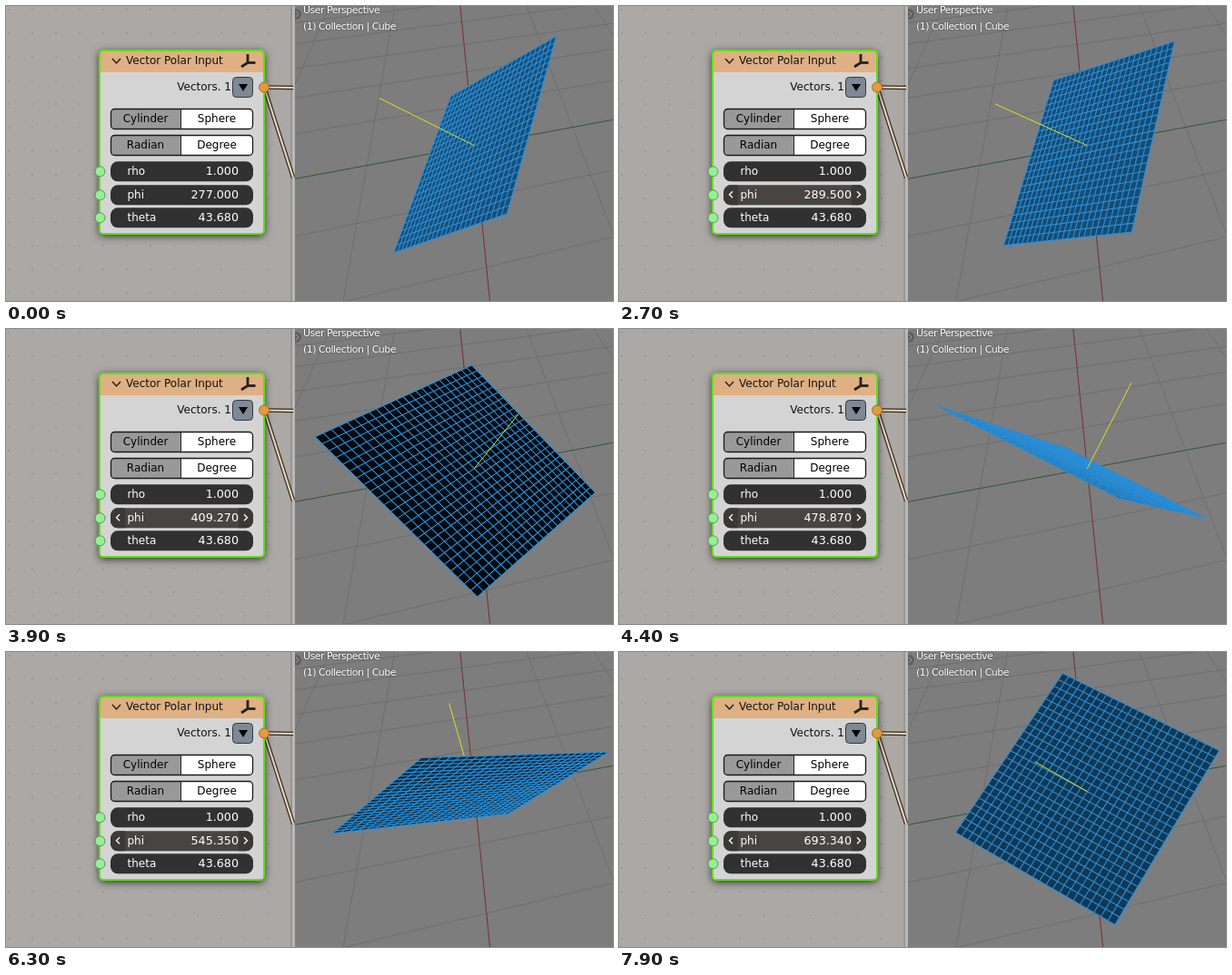
An HTML page with a canvas that plays this animation: 668x325 px, repeating every 8 s.

```html
<!DOCTYPE html>
<html lang="en">
<head>
<meta charset="utf-8">
<title>Vector Polar Input</title>
<style>
html, body { margin: 0; width: 100%; height: 100%; overflow: hidden; background: #7d7d7d; }
canvas { display: block; }
</style>
</head>
<body>
<canvas id="stage" width="668" height="325"></canvas>
<script>
const ctx = document.getElementById('stage').getContext('2d');
const LOOP = 8000, STEP = 100, RAD = Math.PI / 180;
const THETA = 43.68 * RAD, CELLS = 24;

// Time in ms and the phi value dragged to at that time
const PHI_KEYS = [
  [2000, 277], [2100, 277.36], [2200, 277.36], [2700, 289.5], [3100, 310],
  [3400, 340.63], [4000, 423], [4400, 478.87], [4900, 511], [5200, 513.2],
  [5500, 513.2], [5600, 513.61], [6000, 528.4], [6400, 551], [6900, 613.27],
  [7300, 637], [7900, 693.34]
];

function phiAt(t) {
  if (t <= PHI_KEYS[0][0]) return PHI_KEYS[0][1];
  const i = PHI_KEYS.findIndex(key => key[0] >= t);
  const [t0, a] = PHI_KEYS[i - 1], [t1, b] = PHI_KEYS[i];
  return a + (b - a) * (t - t0) / (t1 - t0);
}

// --- vectors and camera ---
const dot = (a, b) => a[0] * b[0] + a[1] * b[1] + a[2] * b[2];
const mix = (a, p, b, q) => a.map((v, i) => v * p + b[i] * q);
const cross = (a, b) => [
  a[1] * b[2] - a[2] * b[1], a[2] * b[0] - a[0] * b[2], a[0] * b[1] - a[1] * b[0]
];
const unit = a => a.map(v => v / Math.hypot(...a));

const CAM_X = [5.1, 113, -24.2], CAM_Y = [50.7, -21, -91.2];
const CAM_W = [-0.122, 0.044, -0.078], TO_EYE = [0.878, 0.062, 0.474];

function project(p) {
  const w = 1 + dot(CAM_W, p);
  return [515.3 + dot(CAM_X, p) / w, 153.7 + dot(CAM_Y, p) / w];
}

// --- drawing helpers ---
function trace(points, close) {
  ctx.beginPath();
  points.forEach(p => ctx.lineTo(p[0], p[1]));
  if (close) ctx.closePath();
}
function stroke(points, color, width = 1) {
  trace(points);
  ctx.strokeStyle = color;
  ctx.lineWidth = width;
  ctx.stroke();
}
function paint(fill, outline, width = 1) {
  if (fill) {
    ctx.fillStyle = fill;
    ctx.fill();
  }
  if (outline) {
    ctx.strokeStyle = outline;
    ctx.lineWidth = width;
    ctx.stroke();
  }
}
function shape(points, fill, outline) {
  trace(points, true);
  paint(fill, outline);
}
function box(x, y, w, h, radius, fill, outline, width) {
  ctx.beginPath();
  ctx.roundRect(x, y, w, h, radius);
  paint(fill, outline, width);
}
function circle(x, y, r, fill, outline) {
  ctx.beginPath();
  ctx.arc(x, y, r, 0, 7);
  paint(fill, outline);
}
function text(str, x, y, color, align = 'left', size = 12) {
  ctx.font = size + 'px "DejaVu Sans", sans-serif';
  ctx.textAlign = align;
  ctx.fillStyle = color;
  ctx.fillText(str, x, y);
}

// --- 3D viewport ---
function floorLine(axis, k, color) {
  const near = axis === 'x' ? [(0.9 + 0.044 * k) / 0.122, k, 0] : [k, (0.122 * k - 0.9) / 0.044, 0];
  const far = axis === 'x' ? [-40, k, 0] : [k, 60, 0];
  stroke([project(near), project(far)], color);
}

function drawPlane(n, phi) {
  const e1 = unit(mix([1, -1, 0], 1, n, -dot([1, -1, 0], n)));
  const e2 = cross(n, e1);
  const at = (u, v) => project(mix(e1, u, e2, v));
  const lit = (1 - Math.sin(phi)) / 2;
  shape([at(-1, -1), at(1, -1), at(1, 1), at(-1, 1)],
    `rgb(${24 * lit}, ${78 * lit}, ${118 * lit})`);
  for (let i = 0; i <= CELLS; i++) {
    const k = 2 * i / CELLS - 1;
    stroke([at(k, -1), at(k, 1)], '#2b8fd8', 1.1);
    stroke([at(-1, k), at(1, k)], '#2b8fd8', 1.1);
  }
}

function drawViewport(phi) {
  ctx.fillStyle = '#7d7d7d';
  ctx.fillRect(316, 0, 352, 325);
  for (let k = -20; k <= 20; k++) {
    if (!k) continue;
    floorLine('x', k, '#6e6e6e');
    if (k < 7) floorLine('y', k, '#6e6e6e');
  }
  floorLine('x', 0, '#7c2d2f');
  floorLine('y', 0, '#2f5a31');

  const s = Math.sin(THETA);
  const n = [s * Math.cos(phi), s * Math.sin(phi), Math.cos(THETA)];
  const vector = () => stroke([project([0, 0, 0]), project(n)], '#dfe01e');
  const front = dot(n, TO_EYE) > 0;
  if (!front) vector();
  drawPlane(n, phi);
  if (front) vector();

  circle(319, 9, 6, '#606060');
  stroke([[319, 6], [322, 9], [319, 12]], '#a0a0a0');
  ctx.save();
  ctx.letterSpacing = '-0.5px';
  ctx.shadowColor = '#0008';
  ctx.shadowBlur = 2;
  text('User Perspective', 327, 8, '#fff', 'left', 11);
  text('(1) Collection | Cube', 327, 26, '#fff', 'left', 11);
  ctx.restore();
}

// --- node editor ---
function toggle(y, left, right) {
  box(115.5, y, 156, 22, 4, '#fff');
  box(115.5, y, 77, 22, [4, 0, 0, 4], '#999');
  stroke([[192.5, y], [192.5, y + 22]], '#222');
  box(115.5, y, 156, 22, 4, null, '#1a1a1a', 1.3);
  text(left, 153.5, y + 14.5, '#000', 'center');
  text(right, 232, y + 14.5, '#000', 'center');
}

function field(y, label, value, active) {
  box(115, y, 157, 22, 8, active ? '#484444' : '#323131');
  if (active) {
    box(115, y, 16, 22, [8, 0, 0, 8], '#3b3838');
    box(256, y, 16, 22, [0, 8, 8, 0], '#3b3838');
    stroke([[125, y + 7], [121.5, y + 10.5], [125, y + 14]], '#fff', 1.3);
    stroke([[262, y + 7], [265.5, y + 10.5], [262, y + 14]], '#fff', 1.3);
  }
  text(label, 133.5, y + 14.7, '#fff');
  text(value, 256, y + 14.7, '#fff', 'right', 12.7);
  circle(103.5, y + 11, 5.5, '#93f093', '#5f9058');
}

function wire(points) {
  stroke(points, '#33281e', 4.5);
  stroke(points, '#e9d6bb', 2.2);
}

function drawNode(phiText, active) {
  ctx.fillStyle = '#aba8a5';
  ctx.fillRect(0, 0, 316, 325);
  ctx.fillStyle = '#9b9895';
  for (let x = 2; x < 313; x += 26)
    for (let y = 3; y < 325; y += 26) ctx.fillRect(x, y, 2, 2);

  ctx.fillStyle = '#989592';
  ctx.fillRect(313, 0, 2, 325);
  ctx.fillStyle = '#b9b8b7';
  ctx.fillRect(315, 0, 3, 325);
  wire([[286, 89.5], [316, 90]]);
  wire([[285, 92], [316, 189]]);

  ctx.save();
  ctx.shadowColor = '#000c';
  ctx.shadowBlur = 10;
  ctx.shadowOffsetY = 2;
  box(103, 49, 181, 202, 4, '#d4d4d4');
  ctx.restore();
  box(103, 49, 181, 24, [4, 4, 0, 0], '#dfb083');
  box(103, 49, 181, 202, 4, null, '#5fe012', 2);

  stroke([[117, 58], [121.5, 63], [126, 58]], '#222', 1.5);
  text('Vector Polar Input', 132, 64, '#111');
  stroke([[266, 53], [266, 62.5], [259, 67]], '#222', 2.8);
  stroke([[266, 62.5], [274.5, 62.5]], '#222', 2.8);

  text('Vectors. 1', 248, 93, '#111', 'right');
  box(249.5, 78.5, 22, 22, 4, '#7d8994', '#343840');
  shape([[256, 86], [266, 86], [261, 94]], '#000');
  circle(284, 89.5, 5.5, '#e39a3c', '#a06c2c');

  toggle(113.5, 'Cylinder', 'Sphere');
  toggle(142.5, 'Radian', 'Degree');
  field(171.3, 'rho', '1.000');
  field(197.3, 'phi', phiText, active);
  field(222.3, 'theta', '43.680');
}

// --- mouse pointer ---
function drawPointer(t) {
  if (t < 100 || t >= 1900) return;
  ctx.save();
  if (t >= 1400) {
    ctx.translate(143, 212);
    shape([[-10, 0], [-5, -5], [-5, -1.5], [5, -1.5], [5, -5], [10, 0],
      [5, 5], [5, 1.5], [-5, 1.5], [-5, 5]], '#fff', '#000');
  } else {
    const k = Math.max(0, (t - 500) / 900), e = k * k * (3 - 2 * k);
    ctx.translate(550.5 - 407 * e, 78.5 + 130 * e);
    shape([[0, 0], [0, 16], [4, 12.5], [6.5, 18], [8.5, 17], [6, 11.5], [11, 11.5]], '#fff', '#000');
  }
  ctx.restore();
}

function frame(now) {
  const t = Math.floor(now % LOOP / STEP) * STEP;
  const degrees = phiAt(t);
  drawViewport(degrees * RAD);
  drawNode(degrees.toFixed(2) + '0', t >= 1400);
  drawPointer(t);
  requestAnimationFrame(frame);
}
requestAnimationFrame(frame);
</script>
</body>
</html>
```
